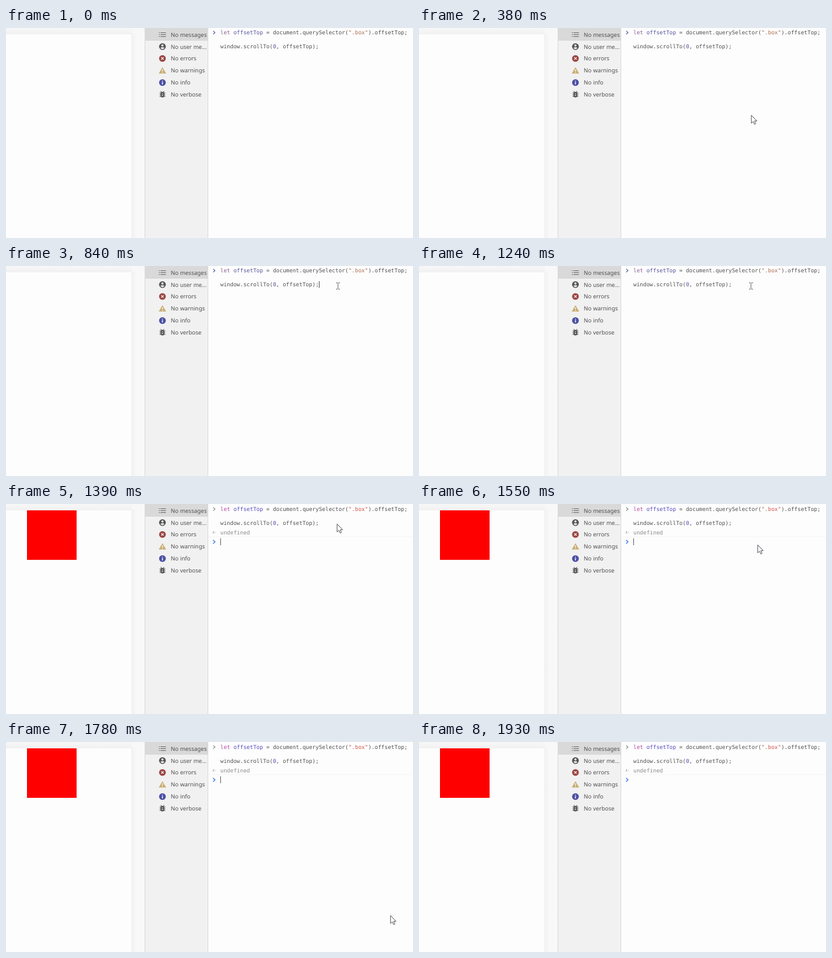
Write an HTML page that moves like this. It is 640 px wide and 331 px high and loops after 2.94 s.

```html
<!DOCTYPE html>
<html lang="en">
<head>
<meta charset="utf-8">
<title>Console scroll demo</title>
<style>
  html, body { margin: 0; width: 100%; height: 100%; overflow: hidden; background: #fdfdfd; }
  svg { display: block; width: 100vw; height: 100vh; }
  text { text-rendering: geometricPrecision; white-space: pre; }
  .code { font: 8.58px "DejaVu Sans Mono", monospace; fill: #515151; }
  .menu { font: 9px "Noto Sans", "Open Sans", sans-serif; fill: #505050; }
  .dark { fill: #575354; }

  .anim { animation: 2940ms step-end infinite; }
  #entry { animation-name: settle; }
  #prompt { animation-name: prompt; }
  .kw { animation-name: keyword; }
  .id { animation-name: name; }
  .str { animation-name: string; }
  #result { animation-name: result; }
  #caret { animation-name: caret; }
  #next-caret { animation-name: nextCaret; }
  #arrow { animation-name: arrow; }
  #beam { animation-name: beam; }

  @keyframes settle { 0% { transform: translateY(0); } 47.27%, to { transform: translateY(.8px); } }
  @keyframes prompt { 0% { stroke: #5f67ac; } 47.27%, to { stroke: #8c8c8c; } }
  @keyframes keyword { 0% { fill: #8b6090; } 47.27%, to { fill: #b54aa6; } }
  @keyframes name { 0% { fill: #54549c; } 47.27%, to { fill: #544cbc; } }
  @keyframes string { 0% { fill: #ad6c50; } 47.27%, to { fill: #ce544c; } }
  @keyframes result { 0% { visibility: hidden; } 47.27%, to { visibility: visible; } }
  @keyframes caret { 0%, 42.17%, to { opacity: 0; } 28.57% { opacity: 1; } }
  @keyframes nextCaret { 0%, 65.64%, to { opacity: 0; } 47.27% { opacity: 1; } }
  @keyframes beam { 0%, 47.27%, to { opacity: 0; } 20.74% { opacity: 1; } }
  @keyframes arrow {
    0% { opacity: 0; transform: translate(560px, 331px); }
    7.82% { opacity: 1; transform: translate(553px, 309px); }
    10.54% { opacity: 1; transform: translate(535px, 220px); }
    12.92% { opacity: 1; transform: translate(522px, 137px); }
    15.64% { opacity: 1; transform: translate(519px, 82px); }
    18.36% { opacity: 1; transform: translate(520px, 49px); }
    20.74% { opacity: 0; transform: translate(520px, 31px); }
    47.27% { opacity: 1; transform: translate(520px, 31px); }
    52.72% { opacity: 1; transform: translate(532px, 64px); }
    55.44% { opacity: 1; transform: translate(556px, 136px); }
    57.82% { opacity: 1; transform: translate(582px, 212px); }
    60.54% { opacity: 1; transform: translate(604px, 273px); }
    62.92% { opacity: 1; transform: translate(622px, 318px); }
    65.64%, to { opacity: 0; transform: translate(630px, 331px); }
  }
</style>
</head>
<body>
<svg viewBox="0 0 640 331" preserveAspectRatio="none">
  <defs>
    <linearGradient id="top" x2="0" y2="1">
      <stop stop-color="#f7f7f7"/><stop offset="1" stop-color="#f1f1f1"/>
    </linearGradient>
    <linearGradient id="side">
      <stop stop-color="#f1f1f1"/><stop offset=".4" stop-color="#f8f8f8"/><stop offset="1" stop-color="#f9f9f9"/>
    </linearGradient>
  </defs>

  <!-- page preview -->
  <rect width="640" height="331" fill="#fdfdfd"/>
  <rect width="198" height="10" fill="url(#top)"/>
  <rect x="197" y="9" width="21" height="322" fill="url(#side)"/>
  <rect x="198" width="20" height="9" fill="#f8f8f8"/>

  <!-- sidebar -->
  <rect x="218" width="100" height="331" fill="#f1f1f1"/>
  <rect x="219" width="99" height="20" fill="#d9d9d9"/>
  <path d="M218.5 0V331M317.5 0V331" stroke="#dadada"/>
  <g class="menu">
    <text x="259" y="14">No messages</text>
    <text x="259" y="32.7">No user me...</text>
    <text x="259" y="51.4">No errors</text>
    <text x="259" y="70.3">No warnings</text>
    <text x="259" y="89.2">No info</text>
    <text x="259" y="108">No verbose</text>
  </g>
  <g transform="translate(246 10.5)" stroke="#6a6a6a" stroke-width="1.1">
    <path d="M-5.5-3h1.5M-5.5 0h1.5M-5.5 3h1.5M-3-3H5.5M-3 0H5.5M-3 3H5.5"/>
  </g>
  <g transform="translate(246 29.3)">
    <circle class="dark" r="5.3"/>
    <circle cy="-1.8" r="1.7" fill="#f1f1f1"/>
    <path d="M-3.2 2.2Q0-.2 3.2 2.2Q0 5.6 -3.2 2.2Z" fill="#f1f1f1"/>
  </g>
  <g transform="translate(246 48)">
    <circle r="5.3" fill="#9c4744"/>
    <path d="M-1.9-1.9L1.9 1.9M1.9-1.9L-1.9 1.9" stroke="#f4eaea" stroke-width="1.3"/>
  </g>
  <g transform="translate(246 67)">
    <path d="M0-5.3L5.8 4.8H-5.8Z" fill="#c8ad72"/>
    <path d="M0-2V1.5M0 2.5V3.7" stroke="#fff" stroke-width="1.2"/>
  </g>
  <g transform="translate(246 86)">
    <circle r="5.3" fill="#4c50a4"/>
    <path d="M0-3.1V-1.8M0-.7V3.1" stroke="#fff" stroke-width="1.4"/>
  </g>
  <g transform="translate(246 104.5)" stroke="#575354" stroke-width="1.1">
    <path d="M-4.6-2.2H4.6M-4.6 .5H4.6M-4.6 3.2H4.6M-2.6-5L-1-3M2.6-5L1-3"/>
    <rect class="dark" x="-2.5" y="-3.2" width="5" height="7.6" rx="2.5"/>
    <path d="M-1.2-.5H1.2M-1.2 2H1.2" stroke="#f1f1f1" stroke-width="1"/>
  </g>

  <!-- console -->
  <g id="entry" class="anim code">
    <path id="prompt" class="anim" d="M325.8 4.6L328.6 7.2L325.8 9.8" fill="none" stroke-width="1.2"/>
    <text x="337" y="10"><tspan class="anim kw">let</tspan> <tspan class="anim id">offsetTop</tspan> = document.querySelector(<tspan class="anim str">".box"</tspan>).offsetTop;</text>
    <text x="337" y="32">window.scrollTo(<tspan class="anim id">0</tspan>, offsetTop);</text>
  </g>
  <path id="caret" class="anim" d="M492.5 24V34.5" stroke="#555"/>
  <g id="result" class="anim">
    <rect x="33" y="10" width="78" height="78" fill="#fe0000"/>
    <path d="M319 51.5H640" stroke="#f6f6f6"/>
    <path d="M327.5 42.6L325 44.8L327.5 47M325.2 44.8H327.4M329 44.8h1" fill="none" stroke="#aaa" stroke-width=".9"/>
    <text class="code" x="337" y="47.8" style="fill:#8c8c8c">undefined</text>
    <path d="M325.6 56.8L328.6 59.6L325.6 62.4" fill="none" stroke="#4580e6" stroke-width="1.4"/>
  </g>
  <path id="next-caret" class="anim" d="M337.5 54V65" stroke="#666"/>

  <!-- pointer -->
  <path id="beam" class="anim" d="M519 26.5H521.3M522.7 26.5H525M522 27V36M519 36.5H521.3M522.7 36.5H525" stroke="#666"/>
  <path id="arrow" class="anim" d="M.7.5V13L3.6 10.4L5.5 14.8L7.5 13.9L5.6 9.6H9.3Z" fill="#fff" stroke="#5a5a64" stroke-linejoin="round"/>
</svg>
</body>
</html>
```
